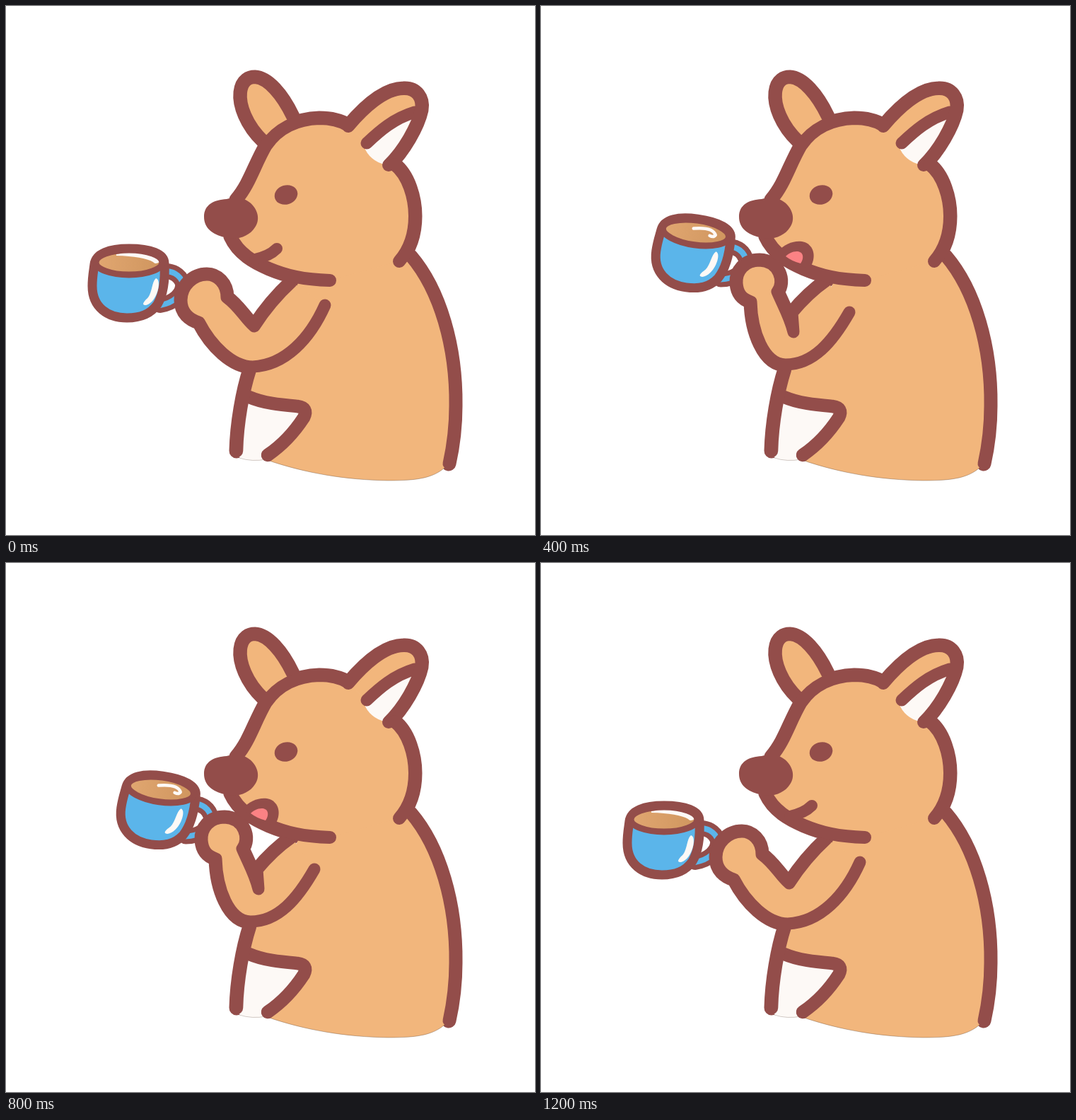
These frames come from a looping animation (748x748 px, 1400 ms). An HTML page with a canvas:

```html
<!DOCTYPE html>
<html lang="en">
<head>
<meta charset="utf-8">
<title>Tea break</title>
<style>
  html, body { margin: 0; width: 100%; height: 100%; overflow: hidden; background: #fff; }
  canvas { display: block; width: 100vw; height: 100vh; }
</style>
</head>
<body>
<canvas id="stage" width="748" height="748"></canvas>
<script>
const ctx = document.getElementById('stage').getContext('2d');
const BROWN = '#934d4a', TAN = '#f2b67c', WHITE = '#fdf9f6', BLUE = '#5bb5ea', PINK = '#fb8284';
const STEP = 200, ORDER = [0, 1, 2, 3, 2, 1, 0];

const fill = (d, color) => { ctx.fillStyle = color; ctx.fill(new Path2D(d)); };
const line = (d, width = 18, color = BROWN) => {
  ctx.strokeStyle = color;
  ctx.lineWidth = width;
  ctx.stroke(new Path2D(d));
};
const shape = (d, color, width) => { fill(d, color); line(d, width); };

const BELLY = 'M345 514 C335 545 327 590 326 629';
const POUCH = 'M344 553 C365 562 390 564 412 566 Q428 568 421 582 C408 602 392 620 370 635';

const upright = {
  earL: 'M364 191 C340 168 330 140 332 122 C334 104 345 101 352 101 C370 102 390 125 405 156',
  earR: 'M484 170 C505 145 535 117 562 117 C580 116 590 130 587 147 C582 170 562 205 541 225',
  earIn: 'M508 198 L578 152 L541 225 Q518 222 508 203 Z',
  earFold: 'M510 194 C528 177 548 159 578 150',
  brow: 'M484 169 C471 161 457 159 443 159 C410 160 384 174 368 197 C352 224 345 252 326 274',
  chin: 'L318 326 C329 350 351 362 372 371 C396 381 420 387 458 388',
  neckEnd: 'L556 361 C570 345 578 325 578 297 C578 272 569 239 549 224 L541 225 Z',
  neck: 'M549 224 C569 239 578 272 578 297 C578 325 570 345 556 361',
  nose: 'M280 298 C280 281 294 274 312 273 C322 270 336 270 345 278 C356 287 360 302 352 313 C344 326 326 332 309 327 C292 323 280 314 280 298 Z',
  eye: [396, 267],
  back: 'M572 354 C613 402 636 482 635 565 C635 595 632 620 626 647',
  base: 'M626 647 C608 668 582 671 540 671 C480 670 425 661 369 642'
};

const leaning = {
  earL: 'M366 182 C350 160 343 130 345 111 C347 93 355 86 364 87 C384 88 404 118 414 152',
  earR: 'M490 173 C515 150 545 131 572 131 C591 131 600 145 594 161 C586 185 565 212 538 234',
  earIn: 'M509 206 L585 168 L538 234 Q515 226 509 206 Z',
  earFold: 'M511 201 C530 185 560 170 587 161',
  brow: 'M490 173 C472 160 455 156 441 156 C405 158 378 176 360 203 C348 222 335 240 318 255',
  chin: 'L307 306 C312 325 326 345 350 360 C375 373 400 380 435 384',
  neckEnd: 'L536 371 C555 352 566 330 567 300 C568 275 562 250 549 234 L538 234 Z',
  neck: 'M549 234 C562 250 568 275 567 300 C566 330 555 352 536 371',
  nose: 'M271 276 C272 258 285 253 300 253 C316 250 332 252 340 261 C350 271 350 287 341 298 C330 311 315 314 300 307 C282 302 271 294 271 276 Z',
  eye: [391, 261],
  back: 'M562 355 C607 398 632 470 632 545 C632 590 625 630 617 654',
  base: 'M617 654 C613 673 582 677 540 677 C470 675 410 664 366 643'
};

const smile = () => line('M352 358 Q372 354 383 343', 16);

const poses = [
  {
    look: upright, mouth: smile,
    cup: [174, 362, 0], shine: [0, 0],
    shoulder: 'M404 390 C380 412 364 433 351 453',
    arm: 'L351 453 C338 442 330 425 312 412 C312 392 298 380 284 380 C265 380 248 396 248 416 C248 434 260 443 273 447 C290 480 320 510 349 510 C395 508 430 470 451 423'
  },
  {
    look: upright, mouth: smile,
    cup: [181.5, 320, 8], shine: [-3, 2],
    shoulder: 'M410 388 C383 403 357 422 338 445',
    arm: 'L338 445 C328 428 316 416 310 404 C313 378 300 360 278 360 C258 360 243 375 244 394 C245 410 252 418 264 424 C272 458 297 500 332 502 C375 501 412 474 442 436'
  },
  {
    look: upright,
    mouth() {
      fill('M335 347 C345 335 362 330 373 334 C386 339 390 355 380 371 L350 365 Z', BROWN);
      fill('M346 354 C350 349 362 344 368 349 C372 353 370 360 367 364 Q355 361 346 354 Z', PINK);
    },
    cup: [219, 320, 8], shine: [-6, 0],
    shoulder: 'M404 388 C384 402 368 418 355 434',
    arm: 'L357 461 C352 440 343 425 334 404 C345 390 337 361 309 360 C288 360 276 375 277 392 C278 406 284 414 297 418 C298 460 315 507 346 507 C385 507 412 475 436 433'
  },
  {
    look: leaning,
    mouth() {
      fill('M322 334 C332 324 346 319 357 323 C371 328 374 344 367 359 L340 352 Z', BROWN);
      fill('M334 341 C340 336 350 334 354 337 C357 341 355 345 353 350 Q343 347 334 341 Z', PINK);
    },
    cup: [273, 340, 8], shine: [-13, -3],
    shoulder: 'M414 390 C400 405 385 422 376 438',
    arm: 'L375 454 L373 422 C384 412 386 400 380 388 C372 375 350 370 335 382 C318 396 322 412 329 424 C321 460 325 510 357 512 C392 512 418 478 440 443'
  }
];

function drawCup([x, y, tilt], [sx, sy]) {
  ctx.save();
  ctx.translate(x, y);
  ctx.rotate(tilt * Math.PI / 180);
  const handle = 'M48 14 C60 11 72 18 76 30 C78 46 62 58 44 61';
  line(handle, 22);
  line(handle, 8, BLUE);
  shape('M-49 3 C-47 -12 -28 -19 0 -19 C30 -19 50 -12 50 2 C51 22 49 45 40 60 C30 74 16 79 -3 79 C-30 79 -52 64 -52 34 C-52 20 -50 12 -49 3 Z', BLUE, 13);

  const tea = ctx.createLinearGradient(-43, 0, 43, 0);
  tea.addColorStop(0, '#e0a670');
  tea.addColorStop(1, '#d0965f');
  ctx.beginPath();
  ctx.ellipse(0, 0.5, 47, 17.5, 0, 0, 7);
  ctx.fillStyle = tea;
  ctx.fill();
  if (!tilt) fill('M-18 -11 C8 -17 42 -12 43 0 Q37 4 34 0 Q20 -8 -18 -9 Z', WHITE);
  ctx.strokeStyle = BROWN;
  ctx.lineWidth = 9;
  ctx.stroke();

  ctx.translate(sx, sy);
  fill('M38 23 C47 25 40 57 24 61 C16 61 22 55 27 50 C33 42 32 28 38 23 Z', WHITE);
  if (tilt) line('M2 -5 Q29 -11 34 0 Q32 4 26 2', 4.5, WHITE);
  ctx.restore();
}

// Slightly wider stroke that shows only outside the filled figure.
function drawRim({ look, shoulder, arm }) {
  const { earL, earR, brow, chin, neck, back } = look;
  line([earL, earR, brow, chin, neck, back, BELLY, shoulder, arm].join(' '), 21);
}

function drawBody({ back, base }) {
  fill(back + base.replace('M', 'L') + 'L420 575 L344 553 L344 515 L385 450 L415 388 L480 340 Z', TAN);
  line(base, 0.7, 'rgba(90,60,40,.5)');
  fill(POUCH + 'L368 641 Q348 645 328 637 L328 600 Z', WHITE);
  line('M330 639 Q348 645 368 641', 0.7, 'rgba(90,60,40,.4)');
  line(POUCH, 18.5);
  line(BELLY, 18.5);
  line(back, 17);
}

function drawHead(look, mouth) {
  shape(look.earL, TAN);
  fill(look.brow + look.chin + look.neckEnd, TAN);
  fill(look.earR, TAN);
  fill(look.earIn, WHITE);
  line(look.earFold, 17);
  line(look.earR);
  line(look.brow + look.chin);
  line(look.neck);
  mouth();
  fill(look.nose, BROWN);
  ctx.beginPath();
  ctx.ellipse(...look.eye, 16.5, 13.5, -0.3, 0, 7);
  ctx.fill();
}

function draw(pose) {
  ctx.fillStyle = '#fff';
  ctx.fillRect(0, 0, 748, 748);
  ctx.lineCap = ctx.lineJoin = 'round';
  drawCup(pose.cup, pose.shine);
  drawRim(pose);
  drawBody(pose.look);
  shape(pose.shoulder + pose.arm, TAN, 17);
  drawHead(pose.look, pose.mouth);
}

function tick() {
  const step = Math.floor(performance.now() / STEP) % ORDER.length;
  draw(poses[ORDER[step]]);
  requestAnimationFrame(tick);
}
tick();
</script>
</body>
</html>
```
